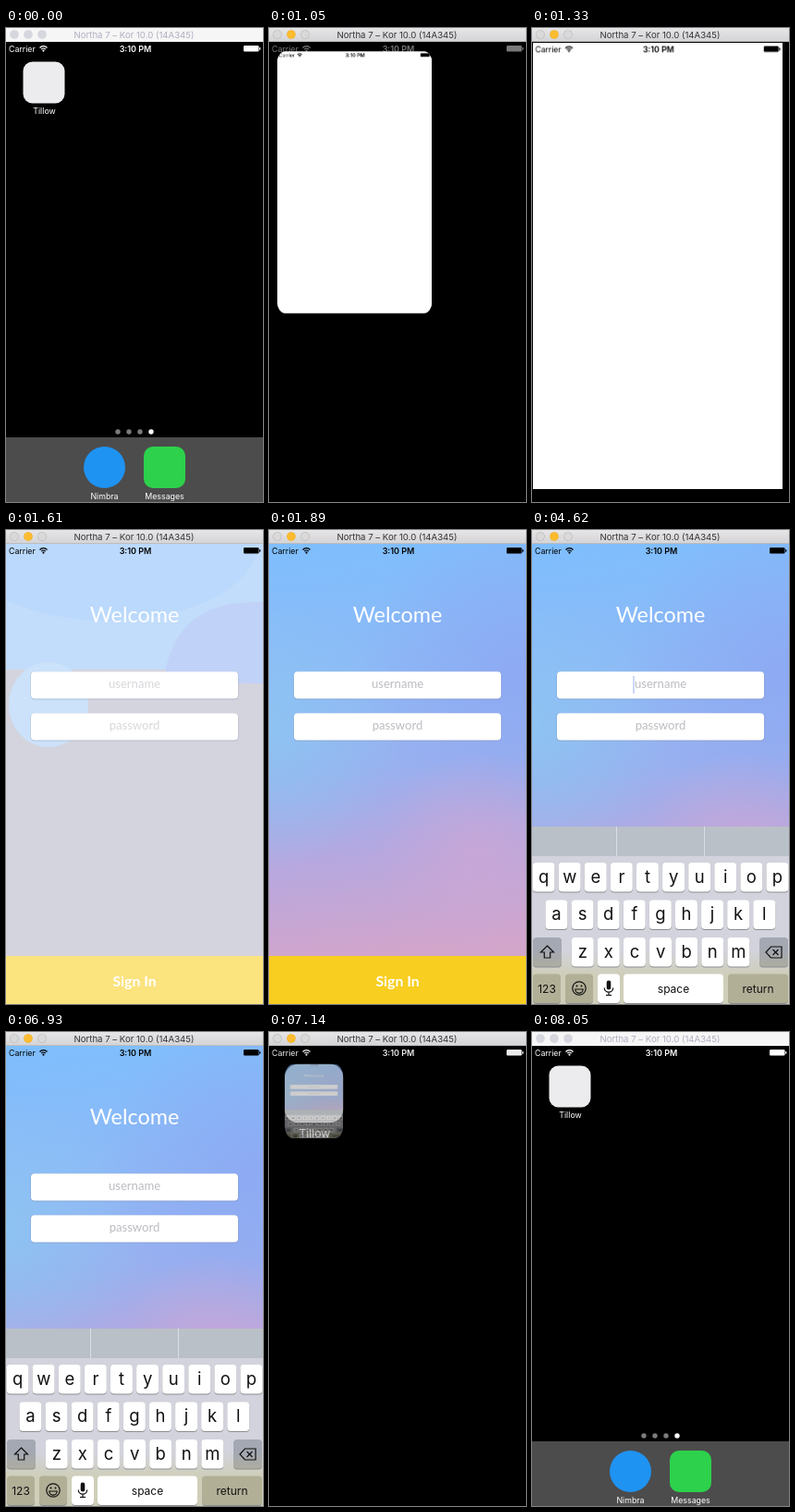
An HTML page with a canvas that plays this animation: 278x513 px, repeating every 8120 ms.

```html
<!DOCTYPE html>
<html lang="en">
<head>
<meta charset="utf-8">
<title>App launch</title>
<style>
html, body { margin: 0; width: 100%; height: 100%; overflow: hidden; background: #000; }
canvas { display: block; width: 278px; height: 513px; }
</style>
</head>
<body>
<canvas id="stage" width="278" height="513"></canvas>
<script>
const W = 278, H = 513, LOOP = 8120, STEP = 70, BAR = 15;
const ICON = { x: 18.5, y: 36.5, size: 45 };
const UI = 'Inter, sans-serif', ROUND = 'Lato, sans-serif';
const stage = document.getElementById('stage').getContext('2d');
const layer = Object.assign(document.createElement('canvas'), { width: W, height: H }).getContext('2d');
let c = stage;

const clamp = v => Math.max(0, Math.min(1, v));
const mix = (a, b, p) => a + (b - a) * p;
const ramp = (t, start, steps = 3) => clamp((t - start + STEP) / (STEP * steps));
const settle = x => x <= 0 ? 1 : (1 + x) * Math.exp(-x);

function rect(x, y, w, h, fill) {
  c.fillStyle = fill;
  c.fillRect(x, y, w, h);
}

function round(x, y, w, h, r, fill) {
  c.beginPath();
  c.roundRect(x, y, w, h, r);
  c.fillStyle = fill;
  c.fill();
}

function disc(x, y, r, fill) {
  c.beginPath();
  c.arc(x, y, r, 0, 7);
  c.fillStyle = fill;
  c.fill();
}

function line(points, color, width = 1.2, close = false) {
  c.beginPath();
  points.forEach(([x, y]) => c.lineTo(x, y));
  if (close) c.closePath();
  c.strokeStyle = color;
  c.lineWidth = width;
  c.stroke();
}

function text(s, x, y, font, fill, align = 'center') {
  c.font = font;
  c.textAlign = align;
  c.fillStyle = fill;
  c.fillText(s, x, y);
}

function gradient(x0, y0, x1, y1, stops) {
  const g = c.createLinearGradient(x0, y0, x1, y1);
  stops.forEach(([at, color]) => g.addColorStop(at, color));
  return g;
}

function glow(x, y, r, rgb, alpha) {
  const g = c.createRadialGradient(x, y, 0, x, y, r);
  g.addColorStop(0, `rgba(${rgb},${alpha})`);
  g.addColorStop(1, `rgba(${rgb},0)`);
  rect(0, BAR, W, H, g);
}

function titleBar(active) {
  rect(0, 0, W, BAR, active ? gradient(0, 0, 0, BAR, [[0, '#e6e6e8'], [1, '#d3d3d6']]) : '#f6f6f6');
  if (active) rect(0, 14, W, 1, '#bdbdbd');
  [9, 24, 39].forEach((x, i) => {
    if (!active) return disc(x, 7, 4.8, '#d6d6de');
    disc(x, 7, 4.8, i === 1 ? '#f0b12c' : '#b9b9b9');
    disc(x, 7, 4.2, i === 1 ? '#fcbc2f' : '#d9d9d9');
  });
  text('Northa 7 – Kor 10.0 (14A345)', 138.5, 10.6, `9.6px ${UI}`, active ? '#333' : '#aeaec0');
}

function statusBar(color) {
  text('Carrier', 3, 25.7, `8.8px ${UI}`, color, 'left');
  text('3:10 PM', 140, 25.7, `600 9px ${UI}`, color);
  c.strokeStyle = color;
  c.lineWidth = 1.3;
  [2.9, 5.3].forEach(r => {
    c.beginPath();
    c.arc(40.5, 25, r, -Math.PI * 0.77, -Math.PI * 0.23);
    c.stroke();
  });
  disc(40.5, 24.6, 1.1, color);
  round(257, 19, 16.5, 6.6, 1.3, color);
  rect(274, 21.2, 1.3, 2.4, color);
}

function home(pressed) {
  round(ICON.x, ICON.y, ICON.size, ICON.size, 10, pressed ? '#777' : '#ececee');
  text('Tillow', 41.5, 92.8, `8.8px ${UI}`, '#fff');
  [121, 133, 145, 157].forEach((x, i) => disc(x, 437, 2.7, i === 3 ? '#fff' : '#7b7b7b'));
  rect(0, 443, W, 70, '#4c4c4c');
  disc(106.5, 475.5, 22.5, '#1f93f2');
  round(149, 453, 45, 45, 10, '#2dd14b');
  text('Nimbra', 106.5, 509.7, `8.8px ${UI}`, '#fff');
  text('Messages', 171.5, 509.7, `8.8px ${UI}`, '#fff');
}

function backdrop() {
  rect(0, BAR, W, H, gradient(60, BAR, 110, 461,
    [[0, '#7fbefd'], [0.3, '#8db9f6'], [0.55, '#99b0ef'], [0.75, '#b5a8e0'], [1, '#d2a5cb']]));
  glow(0, 215, 150, '140,200,242', 0.75);
  glow(270, 150, 170, '140,165,242', 0.75);
  glow(225, 350, 110, '205,166,212', 0.7);
}

// Pale shapes that show through while the login screen fades in.
function wash(alpha) {
  c.save();
  c.globalAlpha = alpha;
  c.beginPath();
  c.rect(0, BAR, W, 446);
  c.clip();
  rect(0, BAR, W, 446, '#d4d4de');
  rect(0, BAR, W, 136, '#c2dcfb');
  c.beginPath();
  c.ellipse(110, 15, 162, 83, 0, 0, 7);
  c.fillStyle = '#bad9fc';
  c.fill();
  c.beginPath();
  c.moveTo(170, 165);
  c.bezierCurveTo(178, 110, 205, 76, 278, 78);
  c.lineTo(278, 166);
  c.fillStyle = '#c1d2f8';
  c.fill();
  c.beginPath();
  c.ellipse(46, 189, 43, 46, 0, 0, 7);
  c.fillStyle = '#cbe2fa';
  c.fill();
  c.restore();
}

function field(y, label, dim) {
  round(26.5, y - 0.2, 225, 30.6, 4.5, 'rgba(110,120,150,.35)');
  round(27, y, 224, 29.4, 4, '#fff');
  text(label, 139, y + 18.2, `13.1px ${ROUND}`, `rgba(188,188,194,${1 - dim})`);
}

function carets(t) {
  const first = t >= 3640 && t < 5040 ? 1 - ramp(t, 4130) + ramp(t, 4620) : 0;
  const second = t >= 5040 && t < 6930 ? 1 - ramp(t, 5600) + ramp(t, 6090) - ramp(t, 6650, 2) : 0;
  rect(109.2, 158, 1.6, 19, `rgba(66,107,242,${first})`);
  rect(109.7, 203, 1.6, 19, `rgba(66,107,242,${second})`);
}

function keyboard(top) {
  const tint = (cool, warm) => gradient(0, 455, 0, 482, [[0, cool], [1, warm]]);
  const dark = tint('#a4a8b2', '#b2af97');
  const ink = '#111';
  const key = (x, y, w, fill = '#fff') => {
    round(x, y + 1, w, 31.5, 4, '#8b8d91');
    round(x, y, w, 31.5, 4, fill);
  };
  const row = (letters, x, y) => [...letters].forEach((ch, i) => {
    const left = x + 28.1 * i;
    key(left, y, 23.9);
    text(ch, left + 12, y + 21.5, `18.5px ${UI}`, ink);
  });

  rect(0, top, W, 192, tint('#d2d3dc', '#cfceb9'));
  rect(0, top, W, 32, '#bac0c7');
  [91, 186].forEach(x => rect(x, top, 1, 32, '#dadee2'));
  row('qwertyuiop', 0.6, top + 39);
  row('asdfghjkl', 14.5, top + 79.5);
  row('zxcvbnm', 42.8, top + 120);

  const y3 = top + 120, y4 = top + 159.5;
  key(1, y3, 31, dark);
  line([[16.5, y3 + 9], [23.5, y3 + 16], [19.7, y3 + 16], [19.7, y3 + 22],
    [13.3, y3 + 22], [13.3, y3 + 16], [9.5, y3 + 16]], ink, 1.2, true);
  key(246, y3, 31, dark);
  line([[253, y3 + 16], [258.5, y3 + 10], [270, y3 + 10], [270, y3 + 22], [258.5, y3 + 22]], ink, 1.2, true);
  line([[260.5, y3 + 13], [266.5, y3 + 19]], ink);
  line([[266.5, y3 + 13], [260.5, y3 + 19]], ink);

  key(1, y4, 30, dark);
  text('123', 16, y4 + 20.5, `12px ${UI}`, ink);
  key(36, y4, 30, dark);
  c.strokeStyle = ink;
  c.lineWidth = 1.2;
  c.beginPath();
  c.arc(51, y4 + 15.5, 7.2, 0, 7);
  c.stroke();
  c.beginPath();
  c.arc(51, y4 + 16.5, 4.2, 0, Math.PI);
  c.closePath();
  c.stroke();
  [48.5, 53.5].forEach(x => disc(x, y4 + 13, 1, ink));
  key(71, y4, 24);
  round(80.7, y4 + 7, 4.6, 10, 2.3, ink);
  c.beginPath();
  c.arc(83, y4 + 15, 4.7, 0, Math.PI);
  c.stroke();
  line([[83, y4 + 19.7], [83, y4 + 23]], ink);
  line([[80, y4 + 23], [86, y4 + 23]], ink);
  key(99, y4, 108);
  text('space', 153, y4 + 20, `12px ${UI}`, ink);
  key(212, y4, 65, dark);
  text('return', 244.5, y4 + 20, `12px ${UI}`, ink);
}

function login(t) {
  const pale = t < 1890 ? 0.42 * Math.pow(0.54, (t - 1610) / STEP) : 0;
  backdrop();
  rect(0, 461, W, 52, '#f8ce20');
  if (pale) {
    rect(0, BAR, W, H, `rgba(255,255,255,${pale})`);
    wash(clamp(1 - (t - 1610) / 240));
  }
  text('Sign In', 139, 493.5, `bold 15.8px ${ROUND}`, '#fff');
  text('Welcome', 139, 100, `23.4px ${ROUND}`, '#fff');
  field(153.2, 'username', pale);
  field(198.2, 'password', pale);
  carets(t);
  if (t >= 3570) keyboard(321 + 49 * Math.pow(0.45, (t - 3570) / STEP));
}

function app(t) {
  rect(0, BAR, W, H, '#fff');
  if (t >= 1540) login(t);
  statusBar('#000');
}

// Share of the way from icon (0) to full screen (1).
function openness(t) {
  if (t < 980 || t >= 7280) return 0;
  if (t < 1400) return 1 - settle((t - 910) * 0.0126);
  return t <= 6930 ? 1 : settle((t - 6930) * 0.02);
}

function zoom(t, p) {
  const x = mix(ICON.x, 0, p), y = mix(ICON.y, BAR, p);
  const w = mix(ICON.size, W, p), h = mix(ICON.size, H - BAR, p);
  c.save();
  c.globalAlpha = clamp(1 - 4 * p);
  c.translate(x, y);
  c.scale(w / ICON.size, w / ICON.size);
  c.translate(-ICON.x, -ICON.y);
  home(t >= 770 && t < 1400);
  c.restore();

  c.save();
  c.globalAlpha = 1 - p;
  statusBar('#fff');
  c.restore();
  if (!p) return;

  c = layer;
  app(t);
  c = stage;
  const corner = clamp(2 * (1 - p));
  c.save();
  c.globalAlpha = clamp(p * 6);
  c.beginPath();
  c.roundRect(x, y, w, h, { x: 9 * corner, y: 13 * corner });
  c.clip();
  c.imageSmoothingQuality = 'high';
  c.drawImage(layer.canvas, 0, BAR, W, H - BAR, x, y, w, h);
  c.restore();
}

function draw(now) {
  const t = Math.floor((now % LOOP) / STEP) * STEP;
  const p = openness(t);
  rect(0, 0, W, H, '#000');
  if (p === 1) app(t);
  else zoom(t, p);
  titleBar(t >= 770 && t < 8050);
}

let start;
function tick(now) {
  start ??= now;
  draw(now - start);
  requestAnimationFrame(tick);
}
draw(0);
requestAnimationFrame(tick);
</script>
</body>
</html>
```
